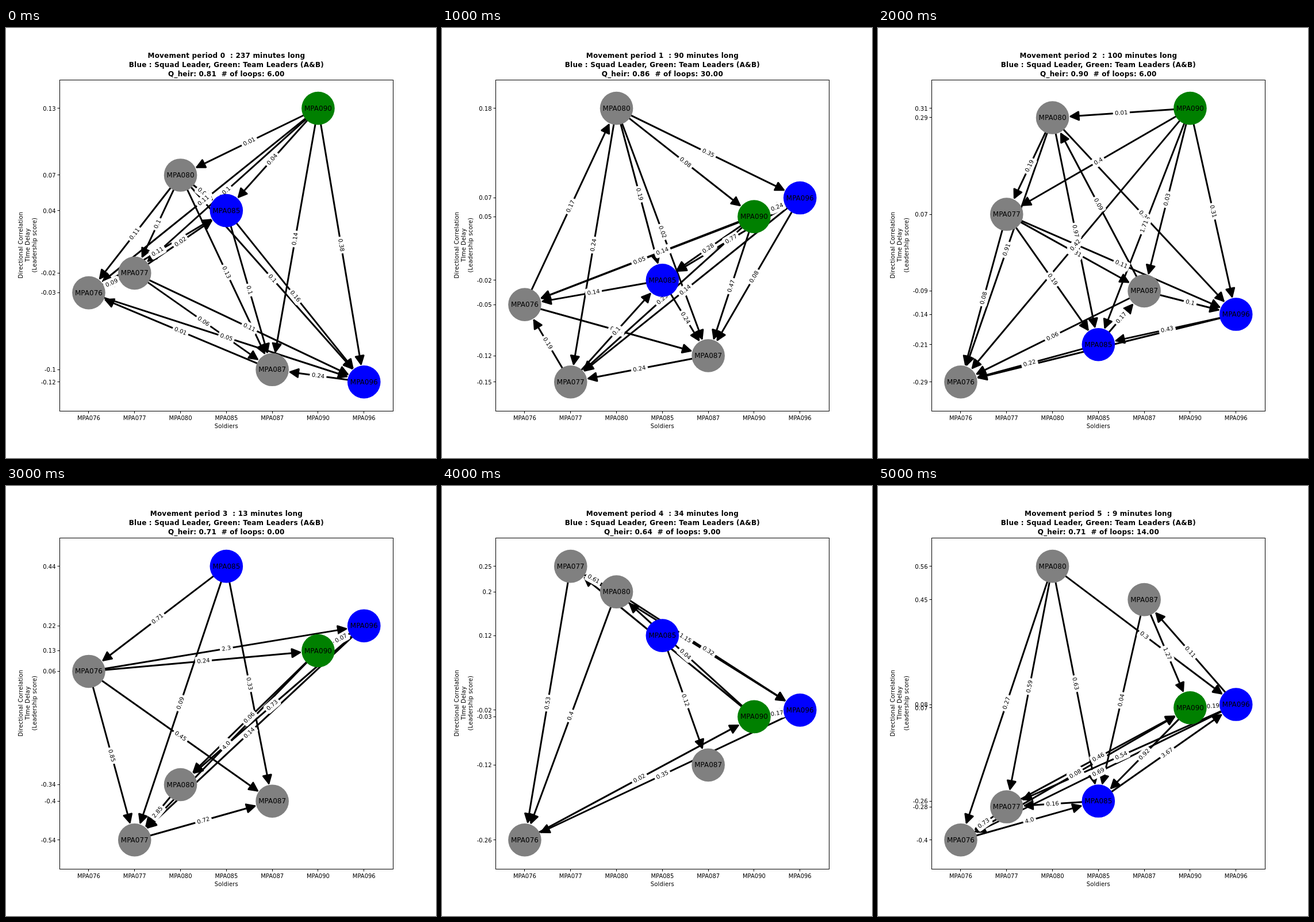
Write an HTML page with a canvas that moves like this. It is 748 px wide and 748 px high and loops after 6 s.

```html
<!DOCTYPE html>
<html lang="en">
<head>
<meta charset="utf-8">
<title>Movement periods</title>
<style>
html, body { margin: 0; width: 100%; height: 100%; overflow: hidden; background: #fff; }
canvas { display: block; width: 748px; height: 748px; }
</style>
</head>
<body>
<canvas id="stage"></canvas>
<script>
const SIZE = 748, HOLD = 1000;
const BOX = { left: 93.5, right: 673.5, top: 90.5, bottom: 666.5 };
const MID_X = 383.35, MID_Y = 377.7, STEP = 79.8, HALF_SPAN = 238.05;
const RADIUS = 28.8, SHRINK = 28.3, LINE = 3, HEAD = 14;
const SANS = '"DejaVu Sans", sans-serif';
const IDS = ['MPA076', 'MPA077', 'MPA080', 'MPA085', 'MPA087', 'MPA090', 'MPA096'];
const LEADERS = { MPA085: '#0000ff', MPA090: '#008000', MPA096: '#0000ff' };

// Scores give heights, ticks and arrow directions. Links name every pair of
// soldiers in turn: "-" is no arrow, "~" an arrow from lower to higher score.
const PERIODS = [
  {
    minutes: 237, q: '0.81', loops: '6.00',
    scores: [-.0348, -.0171, .0711, .0392, -.104, .1313, -.1151],
    links: '0.09 0.11 ~0.11 ~0.01 0.11 0.05 0.1 ~0.02 0.06 0.1 0.11 ' +
      '0.02 0.13 0.01 0.1 0.1 0.04 0.16 0.14 ~0.24 0.38'
  },
  {
    minutes: 90, q: '0.86', loops: '30.00',
    scores: [-.0542, -.1478, .1832, -.0248, -.116, .0522, .0748],
    links: '~0.19 ~0.17 0.14 0.06 0.05 0.14 0.24 ~0.1 0.24 0.25 0.14 ' +
      '0.19 0.02 0.08 0.35 0.24 0.28 0.77 0.47 0.08 0.24'
  },
  {
    minutes: 100, q: '0.90', loops: '6.00',
    scores: [-.293, .0746, .2864, -.211, -.0935, .307, -.1447],
    links: '0.08 0.91 0.22 0.06 0.42 0.1 0.19 0.19 0.31 0.4 0.11 ' +
      '0.97 ~0.09 0.01 0.36 ~0.17 1.71 0.43 0.03 0.1 0.31'
  },
  {
    minutes: 13, q: '0.71', loops: '0.00',
    scores: [.0607, -.543, -.3449, .437, -.404, .1346, .2238],
    links: '0.85 - 0.71 0.45 ~0.24 ~2.3 2.85 0.09 ~0.72 4.0 0.14 ' +
      '- - 0.06 0.73 0.33 - - - - 0.07'
  },
  {
    minutes: 34, q: '0.64', loops: '9.00',
    scores: [-.26, .25, .2024, .121, -.1203, -.0304, -.018],
    links: '0.53 0.4 - - ~0.02 0.35 ~0.61 - - ~0.1 1.15 ' +
      '- - ~0.04 0.32 0.12 - - - - 0.17'
  },
  {
    minutes: 9, q: '0.71', loops: '14.00',
    scores: [-.397, -.2807, .563, -.2605, .4461, .0668, .0783],
    links: '0.73 0.27 ~4.0 - ~0.08 0.69 0.59 0.16 - ~0.46 0.54 ' +
      '0.63 - - 0.3 0.04 0.92 ~3.67 1.27 ~0.11 0.19'
  }
];

const canvas = document.getElementById('stage');
const ctx = canvas.getContext('2d');
const ratio = window.devicePixelRatio || 1;
canvas.width = canvas.height = Math.round(SIZE * ratio);
ctx.scale(ratio, ratio);

function placeNodes({ scores }) {
  const high = Math.max(...scores), low = Math.min(...scores);
  return scores.map((score, i) => ({
    id: IDS[i],
    tick: String(Math.round(score * 100) / 100),
    color: LEADERS[IDS[i]] || '#808080',
    score,
    x: MID_X + (i - 3) * STEP,
    y: MID_Y + HALF_SPAN * ((high + low - 2 * score) / (high - low))
  }));
}

function linkNodes({ links }, nodes) {
  const labels = links.split(' ');
  const edges = [];
  for (let i = 0; i < nodes.length; i++) {
    for (let j = i + 1; j < nodes.length; j++) {
      const label = labels.shift();
      if (label === '-') continue;
      const forward = (nodes[i].score > nodes[j].score) !== label.startsWith('~');
      const [from, to] = forward ? [nodes[i], nodes[j]] : [nodes[j], nodes[i]];
      edges.push({ from, to, label: label.replace('~', ''), dx: to.x - from.x, dy: to.y - from.y });
    }
  }
  return edges.sort((a, b) => a.from.x - b.from.x || a.to.x - b.to.x);
}

const SCENES = PERIODS.map(period => {
  const nodes = placeNodes(period);
  return { period, nodes, edges: linkNodes(period, nodes) };
});

function write(str, x, y, font, { align = 'center', spacing = 0 } = {}) {
  ctx.font = `${font} ${SANS}`;
  ctx.letterSpacing = `${spacing}px`;
  ctx.textAlign = align;
  ctx.fillStyle = '#000';
  ctx.fillText(str, x, y);
}

function stroke(...points) {
  ctx.beginPath();
  for (const [x, y] of points) ctx.lineTo(x, y);
  ctx.stroke();
}

function drawAxes(nodes) {
  ctx.strokeStyle = '#000';
  ctx.lineWidth = 1;
  ctx.lineCap = 'butt';
  ctx.strokeRect(BOX.left, BOX.top, BOX.right - BOX.left, BOX.bottom - BOX.top);
  for (const node of nodes) {
    const x = Math.floor(node.x) + 0.5, y = Math.floor(node.y) + 0.5;
    stroke([x, BOX.bottom], [x, BOX.bottom + 4]);
    stroke([BOX.left, y], [BOX.left - 4, y]);
    write(node.id, node.x, 682, '10px');
    write(node.tick, 86.5, Math.round(node.y + 3.9), '10px', { align: 'right' });
  }
}

function drawTitles({ minutes, q, loops }, index) {
  const loose = { spacing: 0.15 }, looser = { spacing: 0.2 };
  write('Soldiers', MID_X, 696, '10px', loose);
  ctx.save();
  ctx.translate(0, MID_Y);
  ctx.rotate(-Math.PI / 2);
  ['Directional Correlation', 'TIme Delay', '(Leadership score)']
    .forEach((line, i) => write(line, 0, 29 + 12 * i, '10px', loose));
  ctx.restore();
  [
    `Movement period ${index}  : ${minutes} minutes long`,
    'Blue : Squad Leader, Green: Team Leaders (A&B)',
    `Q_heir: ${q}  # of loops: ${loops}`
  ].forEach((line, i) => write(line, MID_X, 52 + 16 * i, 'bold 12px', looser));
}

function drawArrow({ from, dx, dy }) {
  ctx.save();
  ctx.translate(from.x, from.y);
  ctx.rotate(Math.atan2(dy, dx));
  ctx.strokeStyle = ctx.fillStyle = '#000';
  ctx.lineWidth = LINE;
  ctx.lineCap = ctx.lineJoin = 'round';
  const tip = Math.hypot(dx, dy) - SHRINK - 3.35;
  stroke([SHRINK, 0], [tip, 0]);
  ctx.beginPath();
  ctx.moveTo(tip, 0);
  ctx.lineTo(tip - HEAD, -HEAD / 2);
  ctx.lineTo(tip - HEAD, HEAD / 2);
  ctx.closePath();
  ctx.fill();
  ctx.stroke();
  ctx.restore();
}

function drawLabel({ from, dx, dy, label }) {
  ctx.save();
  ctx.translate(from.x + dx / 2, from.y + dy / 2);
  ctx.rotate(Math.atan(dy / dx));
  ctx.font = `10px ${SANS}`;
  ctx.letterSpacing = '0px';
  const w = ctx.measureText(label).width + 6;
  ctx.fillStyle = ctx.strokeStyle = '#fff';
  ctx.lineWidth = 1;
  ctx.beginPath();
  ctx.roundRect(-w / 2, -8, w, 16, 3);
  ctx.fill();
  ctx.stroke();
  write(label, 0, 3, '10px');
  ctx.restore();
}

function drawDisc({ x, y, color }) {
  ctx.fillStyle = color;
  ctx.beginPath();
  ctx.arc(x, y, RADIUS, 0, 2 * Math.PI);
  ctx.fill();
}

function draw(index) {
  const { period, nodes, edges } = SCENES[index];
  ctx.fillStyle = '#fff';
  ctx.fillRect(0, 0, SIZE, SIZE);
  edges.forEach(drawArrow);
  edges.forEach(drawLabel);
  nodes.forEach(drawDisc);
  nodes.forEach(({ id, x, y }) => write(id, x, Math.round(y + 4), '12px'));
  drawAxes(nodes);
  drawTitles(period, index);
}

const start = performance.now();

function tick() {
  draw(Math.floor((performance.now() - start) / HOLD) % SCENES.length);
  requestAnimationFrame(tick);
}
tick();
</script>
</body>
</html>
```
